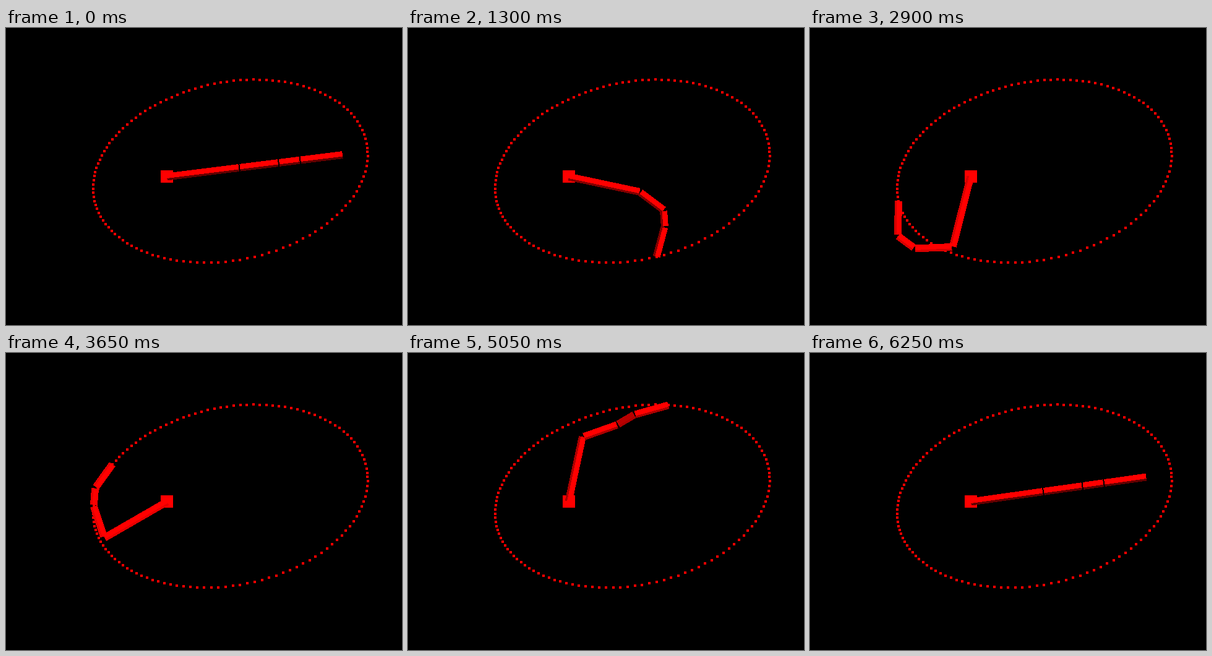
These frames come from a looping animation (640x480 px, 6300 ms). An HTML page:

```html
<!DOCTYPE html>
<html lang="en">
<head>
<meta charset="utf-8">
<title>Arm following a path</title>
<style>
  html, body { margin: 0; width: 100%; height: 100%; overflow: hidden; background: #000; }
  svg { display: block; width: 640px; height: 480px; shape-rendering: crispEdges; }
</style>
</head>
<body>
<svg viewBox="0 0 640 480">
  <path id="dots" fill="#f00"/>
  <rect x="250" y="230" width="20" height="20" fill="#f00"/>
  <g id="arm"></g>
</svg>
<script>
const LOOP = 6300, STEP = 50, REACH = 286;
const BASE = { x: 260, y: 240 };
const RAD = Math.PI / 180;

const polar = (from, angle, len) => ({
  x: from.x + len * Math.cos(angle * RAD),
  y: from.y + len * Math.sin(angle * RAD)
});
const distance = (a, b) => Math.hypot(b.x - a.x, b.y - a.y);
const direction = (a, b) => Math.atan2(b.y - a.y, b.x - a.x) / RAD;

// Circle seen in perspective, once around in 2 PI seconds
function pathPoint(sec) {
  const c = Math.cos(sec), s = Math.sin(sec);
  const w = 1 - 0.0845 * c - 0.0546 * s;
  return {
    x: (344.3 + 190.75 * c - 24.4 * s) / w,
    y: (225.45 - 42.8 * c + 132.85 * s) / w
  };
}

// Shoulder direction and the bends of the two outer joints, in degrees
const KEYS = [
  { at: 0.6, pose: [11, 0, 0] },
  { at: 1.3, pose: [12, 49, 19] },
  { at: 2.25, pose: [68, 49, 65] },
  { at: 3.65, pose: [150, 23, 31] },
  { at: 4.55, pose: [230, 2, 12] },
  { at: 5.5, pose: [327, -18, 17] },
  { at: 5.8, pose: [340, 0, 0] }
];
const LAST = KEYS.length - 1, START = KEYS[0].at, END = KEYS[LAST].at;

function slope(i, field) {
  const a = KEYS[Math.max(0, i - 1)], b = KEYS[Math.min(LAST, i + 1)];
  return (b.pose[field] - a.pose[field]) / (b.at - a.at);
}

// Smooth Hermite curve through the key poses
function poseAt(sec) {
  const i = KEYS.findIndex(key => key.at > sec) - 1;
  const a = KEYS[i], b = KEYS[i + 1];
  const span = b.at - a.at, p = (sec - a.at) / span, q = 1 - p;
  return a.pose.map((from, f) =>
    from * q * q * (1 + 2 * p) + b.pose[f] * p * p * (3 - 2 * p)
    + span * p * q * (q * slope(i, f) - p * slope(i + 1, f)));
}

// How far the arm is folded (0 = stretched) and leaning away from the viewer
function foldAt(sec) {
  const p = Math.min(1, Math.max(0, (sec - START) / (END - START)));
  return Math.sin(Math.PI * p ** 1.3);
}
const leanAt = sec => Math.exp(-(((sec - 4.7) / 0.55) ** 2));

function jointsAt(sec) {
  const target = pathPoint(sec), aim = direction(BASE, target);
  const goal = polar(BASE, aim, Math.min(REACH, distance(BASE, target)));
  const stretched = sec <= START || sec >= END;
  const [shoulder, bend, wrist] = stretched ? [aim, 0, 0] : poseAt(sec);

  // Bent chain of the outer links, then turned and scaled to span elbow to goal
  const a = polar({ x: 0, y: 0 }, 0, 64);
  const b = polar(a, bend, 35);
  const c = polar(b, bend + wrist, 70 - 13 * foldAt(sec));
  const origin = { x: 0, y: 0 };
  const elbow = polar(BASE, shoulder, 117 - 15 * leanAt(sec));
  const turn = direction(elbow, goal) - direction(origin, c);
  const scale = distance(elbow, goal) / distance(origin, c);
  const place = pt => polar(elbow, direction(origin, pt) + turn, distance(origin, pt) * scale);
  return [BASE, elbow, place(a), place(b), goal];
}

const arm = document.getElementById("arm");
function addFace() {
  return arm.appendChild(document.createElementNS("http://www.w3.org/2000/svg", "polygon"));
}
const faces = Array.from({ length: 4 }, () => [addFace(), addFace()]);

// Strip along a-b between two sideways offsets
function setStrip(face, a, b, low, high, gap, shade) {
  const len = distance(a, b), ux = (b.x - a.x) / len, uy = (b.y - a.y) / len;
  const at = (d, off) => `${(a.x + ux * d - uy * off).toFixed(2)},${(a.y + uy * d + ux * off).toFixed(2)}`;
  face.setAttribute("points", [at(gap, low), at(len, low), at(len, high), at(gap, high)].join(" "));
  face.setAttribute("fill", `rgb(${Math.round(shade)},0,0)`);
}

function draw(sec) {
  const joints = jointsAt(sec);
  const edgeShade = 100 + 130 * foldAt(sec);
  faces.forEach(([main, edge], i) => {
    const a = joints[i], b = joints[i + 1], gap = i ? 2 : 0;
    // the dark face looks down and left, away from the light
    const side = 0.6 * (b.y - a.y) + 0.8 * (b.x - a.x) > 0 ? 1 : -1;
    const shade = i === 2 ? 255 - 105 * leanAt(sec) : 255;
    setStrip(main, a, b, -5.5 * side, 3 * side, gap, shade);
    setStrip(edge, a, b, 3 * side, 6.5 * side, gap, Math.min(shade, edgeShade));
  });
}

let dots = "";
for (let ms = 0; ms < LOOP; ms += STEP) {
  const { x, y } = pathPoint(ms / 1000);
  dots += `M${Math.round(x) - 2} ${Math.round(y) - 2}h4v4h-4z`;
}
document.getElementById("dots").setAttribute("d", dots);

function tick() {
  const ms = performance.now() % LOOP;
  draw(Math.floor(ms / STEP) * STEP / 1000);
  requestAnimationFrame(tick);
}
tick();
</script>
</body>
</html>
```
